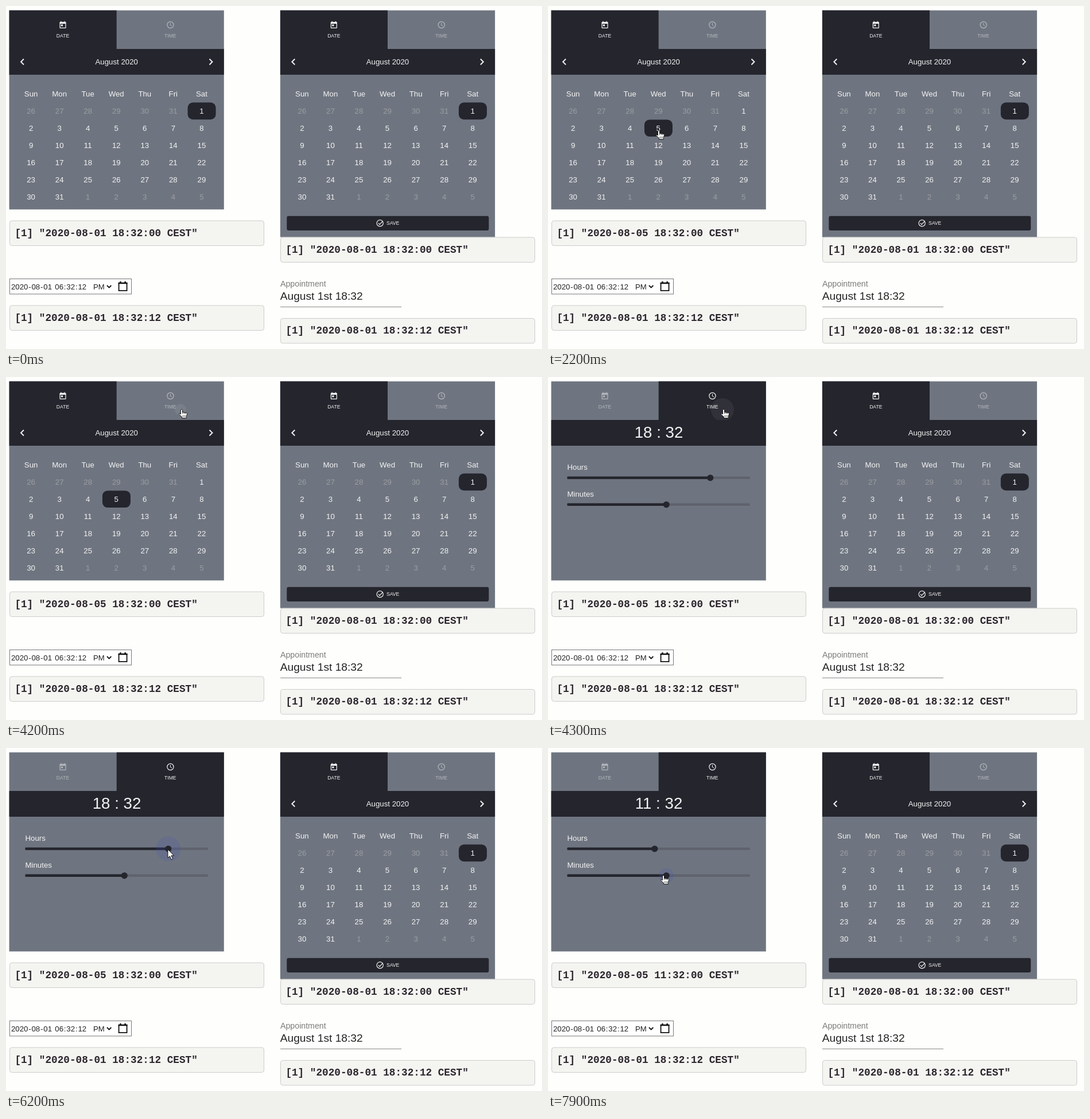
An HTML page that plays this animation: 934 px wide and 599 px high, repeating every 8000 ms.

```html
<!DOCTYPE html>
<html lang="en">
<head>
<meta charset="utf-8">
<title>Date and time pickers</title>
<style>
html, body { margin: 0; width: 100%; height: 100%; overflow: hidden; background: #fefefc; }
svg { display: block; font-family: "Liberation Sans", Arial, sans-serif; white-space: pre; }
.code { font: bold 17.7px "Liberation Mono", monospace; }
</style>
</head>
<body>
<svg id="stage" width="934" height="599" viewBox="0 0 934 599"></svg>
<script>
const LOOP = 8000, STEP = 100;
const DARK = '#24252d', GREY = '#6f7580', LIGHT = '#f3f3f3', FADED = '#9b9da1', DIM = '#b3b6bb';
const LEFT = 5.6, TOP = 7.6, WIDTH = 374.2, TRACK_X = 33.5, TRACK_WIDTH = 318.5;

const rect = (x, y, w, h, fill, extra = '') =>
  `<rect x="${x}" y="${y}" width="${w}" height="${h}" fill="${fill}" ${extra}/>`;
const line = (d, color, width) =>
  `<path d="${d}" fill="none" stroke="${color}" stroke-width="${width}"/>`;
// y is the middle of the capital letters
const text = (x, y, str, size, fill, anchor = 'middle', extra = '') =>
  `<text x="${x}" y="${Math.round(y + size * 0.36)}" font-size="${size}" fill="${fill}" text-anchor="${anchor}" ${extra}>${str}</text>`;

const clockIcon = color =>
  `<g transform="translate(286.5 33)"><circle r="5.6" fill="none" stroke="${color}" stroke-width="1.2"/>` +
  line('M0-3.4V.4L2.7 2', color, 1) + '</g>';
const dateIcon = color =>
  `<path transform="translate(91.6 26) scale(.62)" fill="${color}" fill-rule="evenodd"
    d="M19 3h-1V1h-2v2H8V1H6v2H5a2 2 0 0 0-2 2v14a2 2 0 0 0 2 2h14a2 2 0 0 0 2-2V5a2 2 0 0 0-2-2zM19 19H5V8h14zM7 10h5v5H7z"/>`;

function tabs(timeActive) {
  const dateColor = timeActive ? DIM : LIGHT, timeColor = timeActive ? LIGHT : DIM;
  return rect(LEFT + (timeActive ? WIDTH / 2 : 0), TOP, WIDTH / 2, 68, DARK) + rect(LEFT, 75, WIDTH, 45, DARK) +
    dateIcon(dateColor) + text(99, 52, 'DATE', 8.6, dateColor) +
    clockIcon(timeColor) + text(286.3, 52, 'TIME', 8.6, timeColor);
}

const column = i => 43.6 + 49.55 * i;
const row = i => 183.4 + 29.9 * i;
const pillPlace = (col, line) => ({ x: column(col) - 24.3, y: row(line) - 14.9 });

function calendar(pillId) {
  const pill = pillPlace(6, 0);
  let out = tabs(false) + text(192.7, 97.3, 'August 2020', 13.25, LIGHT) +
    line('M31 92.5L26 97.5L31 102.5M354.5 92.5L359.5 97.5L354.5 102.5', LIGHT, 1.9) +
    rect(pill.x, pill.y, 49, 29.7, DARK, `rx="9" id="${pillId}"`);
  ['Sun', 'Mon', 'Tue', 'Wed', 'Thu', 'Fri', 'Sat'].forEach((day, i) => {
    out += text(column(i), 153.6, day, 13.25, LIGHT);
  });
  for (let i = 0; i < 42; i++) {
    const day = i - 5, inMonth = day >= 1 && day <= 31;
    const label = (day + 30) % 31 + 1;
    out += text(column(i % 7), row(Math.floor(i / 7)), label, 13.25, inMonth ? LIGHT : FADED);
  }
  return out;
}

function slider(name, label, y) {
  return text(TRACK_X, y - 18.7, label, 13.25, LIGHT, 'start') +
    rect(TRACK_X, y - 2.3, TRACK_WIDTH, 4.6, DARK, 'rx="1" opacity=".22"') +
    rect(TRACK_X, y - 2.3, 0, 4.6, DARK, `rx="1" id="${name}Fill"`) +
    `<circle id="${name}Halo" cy="${y}" fill="#3f51b5" opacity=".18"/>` +
    `<circle id="${name}Thumb" cy="${y}" r="5.6" fill="${DARK}"/>`;
}

const output = (x, y, id, time) =>
  rect(x + 0.5, y + 0.5, 443, 43.5, '#f4f4f1', 'rx="4" stroke="#cccccb"') +
  `<text id="${id}" class="code" x="${x + 9.4}" y="${Math.round(y + 27)}" fill="#2b252c">[1] "2020-08-01 ${time} CEST"</text>`;

const inputParts = ['2020', '-', '08', '-', '01', ' ', '06', ':', '32', ':', '12']
  .map((part, i) => `<tspan dx="${i ? 0.8 : 0}">${part}</tspan>`).join('');

stage.innerHTML =
  rect(0, 0, 934, 599, '#fefefc') +
  rect(LEFT, TOP, WIDTH, 347.7, GREY) +
  `<g id="dateView">${calendar('pill')}</g>` +
  `<g id="timeView">${tabs(true)}${text(193, 96, '', 27.7, LIGHT, 'middle', 'id="clock"')}
    ${slider('hour', 'Hours', 176)}${slider('minute', 'Minutes', 222.8)}</g>` +
  `<clipPath id="tabClip">${rect(193, 8, 187, 67, '#000')}</clipPath>
   <g clip-path="url(#tabClip)"><circle id="ripple" cx="304" cy="57" fill="#fff"/></g>` +
  output(6, 374.5, 'result', '18:32:00') +
  rect(6.5, 476.5, 212, 26.5, '#fff', 'stroke="#777"') +
  text(9, 490.2, inputParts, 13.25, '#222', 'start') + text(152, 490.2, 'PM', 13.25, '#222', 'start') +
  line('M176 488L179.7 491.7L183.4 488', '#111', 1.8) +
  line('M196.6 484H210.6V497.2H196.6Z', '#111', 1.8) + line('M195.7 484H211.5M199.5 481V484M207.7 481V484', '#111', 2.6) +
  output(6, 522.5, 'inputResult', '18:32:12') +
  `<g transform="translate(472.3 0)">${rect(LEFT, TOP, WIDTH, 396, GREY)}${calendar('savedPill')}
    ${rect(17, 366.7, 352, 25.3, DARK, 'rx="3"')}
    <circle cx="179.4" cy="379.3" r="5.6" fill="none" stroke="${LIGHT}" stroke-width="1.2"/>
    ${line('M176.6 379.3L178.8 381.6L184.4 375.6', LIGHT, 1.3)}${text(201.8, 379.2, 'SAVE', 8.6, LIGHT)}</g>` +
  output(478, 403.5, 'savedResult', '18:32:00') +
  text(478, 484.6, 'Appointment', 14.2, '#7b7b7b', 'start') +
  text(477.7, 506.4, 'August 1st 18:32', 19.2, '#222', 'start') +
  rect(478, 525, 211, 1, '#8a8a8a') +
  output(478, 545, 'appointmentResult', '18:32:12') +
  `<g id="cursor" stroke="#111" stroke-linejoin="round">
    <g id="hand"><path fill="#fff" d="M-1.6 9V1.5Q0-.7 1.6 1.5V5.3L8.6 6.6Q9.8 7 9.7 8.6L8.3 12.5V15.7H.3V13.5L-4.6 9.2Q-4.4 6.7-1.6 9Z"/>
      <path fill="none" stroke-width=".8" d="M1.6 5V8.5M4.3 6V8.5M7 6.5V8.7M2 11V13.5M4.2 11V13.5M6.4 11V13.5"/></g>
    <path id="arrow" fill="#fff" d="M0 0V15L3.5 11.8L6.1 17.8L8.6 16.7L6 10.9H10.6Z"/></g>`;

const $ = id => document.getElementById(id);
const show = (id, on) => $(id).setAttribute('visibility', on ? 'visible' : 'hidden');
const set = (id, attrs) => { for (const key in attrs) $(id).setAttribute(key, attrs[key]); };

const ramp = (t, start, duration) => Math.min(1, Math.max(0, (t - start) / duration));
const easeOut = p => 1 - (1 - p) ** 2;

const cursorStart = { x: 114, y: 33 };
const cursorMoves = [
  { start: 700, duration: 700, x: 193, y: 217 },
  { start: 3000, duration: 800, x: 306, y: 56 },
  { start: 4800, duration: 400, x: 286, y: 174 },
  { start: 5200, duration: 600, x: 282, y: 177 },
  { start: 6200, duration: 500, x: 184, y: 176 },
  { start: 7000, duration: 900, x: 201, y: 222 }
];
const cursorAt = t => cursorMoves.reduce((from, move) => {
  const p = easeOut(ramp(t, move.start, move.duration));
  return { x: from.x + (move.x - from.x) * p, y: from.y + (move.y - from.y) * p };
}, cursorStart);

function placeSlider(name, fraction, halo) {
  const x = TRACK_X + TRACK_WIDTH * fraction;
  set(name + 'Fill', { width: x - TRACK_X });
  set(name + 'Thumb', { cx: x });
  set(name + 'Halo', { cx: x, r: halo });
}

function render(t) {
  const timeActive = t >= 4300, picked = t >= 2200;
  show('dateView', !timeActive);
  show('timeView', timeActive);
  set('pill', picked ? pillPlace(3, 1) : pillPlace(6, 0));

  const hour = 18 - Math.round(7 * easeOut(ramp(t, 6200, 500)));
  const hover = ramp(t, 5100, 100) - ramp(t, 7000, 300);
  const press = ramp(t, 5700, 300) - ramp(t, 6900, 200);
  placeSlider('hour', hour / 23, 13 * hover + 8.7 * press);
  placeSlider('minute', 32 / 59, 13 * ramp(t, 7600, 300));
  $('clock').textContent = `${hour} : 32`;
  $('result').textContent = `[1] "2020-08-0${picked ? 5 : 1} ${hour}:32:00 CEST"`;
  set('result', { opacity: 1 - 0.25 * (ramp(t, 6400, 200) - ramp(t, 6700, 100)) });

  const spread = ramp(t, 4100, 600);
  set('ripple', { r: 60 * spread, opacity: 0.09 * (1 - spread) });

  const { x, y } = cursorAt(t);
  const overHeader = y > 75 && y < 160;
  const isArrow = overHeader || (t >= 5400 && t < 6800);
  set('cursor', { transform: `translate(${x} ${y})` });
  show('hand', t >= 700 && !isArrow);
  show('arrow', t >= 700 && isArrow);
}

const start = performance.now();
function tick() {
  const t = (performance.now() - start) % LOOP;
  render(Math.floor(t / STEP) * STEP);
  requestAnimationFrame(tick);
}
tick();
</script>
</body>
</html>
```
